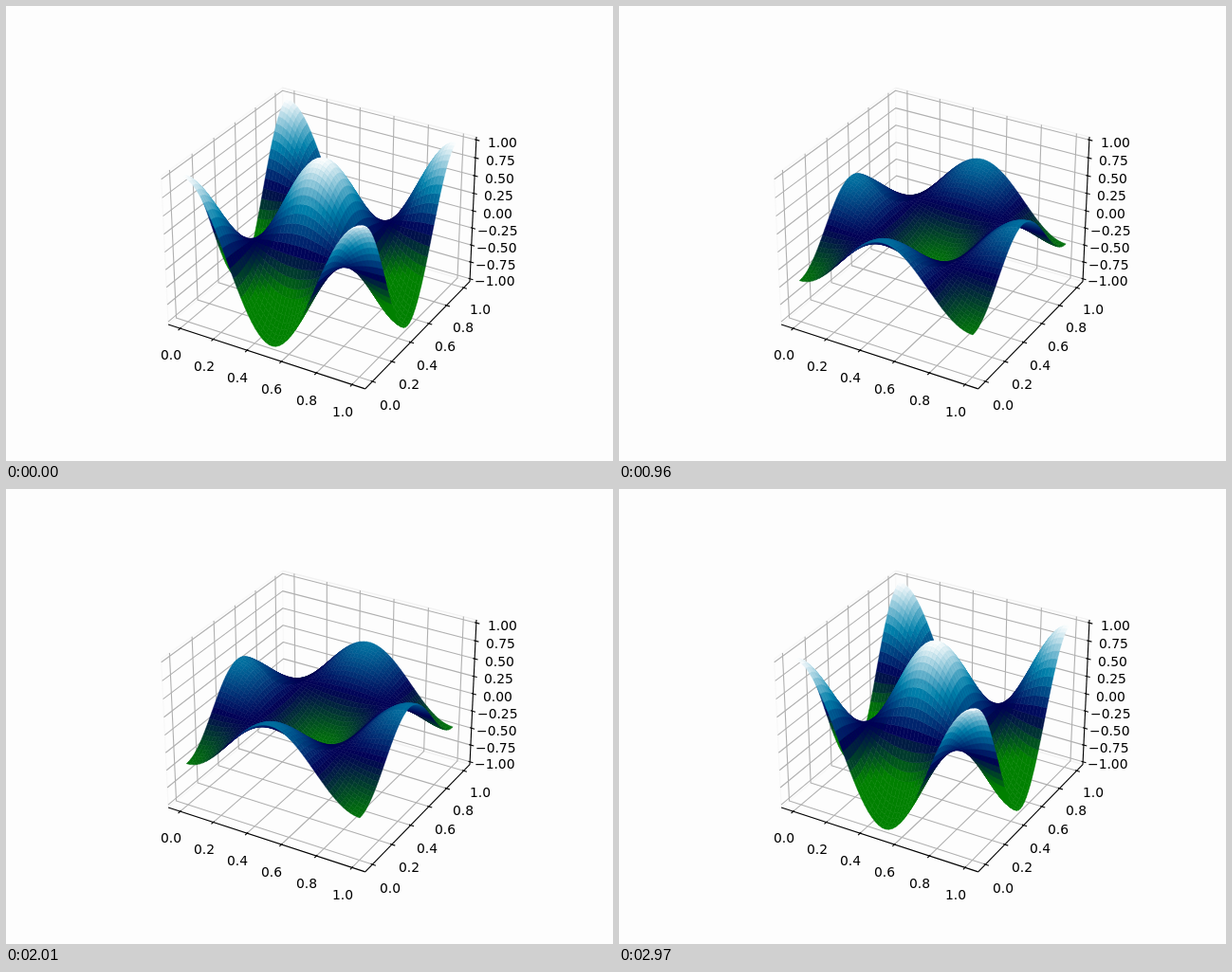
These frames come from a looping animation (640x480 px, 3000 ms). An HTML page with a canvas:

```html
<!DOCTYPE html>
<html>
<head>
<meta charset="utf-8">
<style>
html, body { margin: 0; width: 100%; height: 100%; overflow: hidden; background: #fdfdfd; }
canvas { display: block; }
</style>
</head>
<body>
<canvas id="stage" width="640" height="480"></canvas>
<script>
const ctx = document.getElementById('stage').getContext('2d');

// Box half sizes, pane overhang, and step lengths for ticks and labels
const SIDE = 8 / 7, HEIGHT = 6 / 7;
const H = SIDE * (0.5 + 1 / 48), HZ = HEIGHT * (0.5 + 1 / 48);
const TICK = SIDE / 12, PAD = 1.0372;
const LAB = H + PAD * SIDE / 12, LABZ = HZ + PAD * HEIGHT / 12;
const S3 = Math.sqrt(3);

// Data to box coordinates (x and y carry a 5% margin)
const bx = v => SIDE * (v - 0.5) / 1.1;
const bz = v => HEIGHT * v / 2;

// Perspective view: elevation 30, azimuth -60, distance 10
function project([x, y, z]) {
  const right = S3 / 2 * x + y / 2;
  const up = -x / 4 + S3 / 4 * y + S3 / 2 * z;
  const near = S3 / 4 * x - 0.75 * y + z / 2;
  const k = 369.6 / 0.185 / (10 - near);
  return [143.2 + 369.6 * 0.095 / 0.185 + k * right,
          427.2 - 369.6 * 0.095 / 0.185 - k * up, near];
}

function trace(points) {
  ctx.beginPath();
  for (const p of points) ctx.lineTo(p[0], p[1]);
}

function line(points, color, width = 1.11) {
  trace(points.map(project));
  ctx.strokeStyle = color;
  ctx.lineWidth = width;
  ctx.stroke();
}

// Label centred by its ink, hanging below the anchor
function label(text, point) {
  const [x, y] = project(point), m = ctx.measureText(text);
  const ink = m.actualBoundingBoxLeft + m.actualBoundingBoxRight;
  ctx.fillText(text, Math.round(x - ink / 2), Math.round(y + 11));
}

const xyTicks = [0, 0.2, 0.4, 0.6, 0.8, 1];
const zTicks = [-1, -0.75, -0.5, -0.25, 0, 0.25, 0.5, 0.75, 1];

function drawAxes() {
  line([[-H, -H, -HZ], [-H, H, -HZ], [-H, H, HZ], [-H, -H, HZ], [-H, -H, -HZ]], '#f8f8f8', 1.39);
  line([[-H, H, -HZ], [H, H, -HZ], [H, H, HZ], [-H, H, HZ]], '#f2f2f2', 1.39);
  line([[-H, -H, -HZ], [H, -H, -HZ], [H, H, -HZ]], '#f5f5f5', 1.39);

  const grid = '#b0b0b0';
  for (const t of xyTicks) {
    const p = bx(t);
    line([[p, -H, -HZ], [p, H, -HZ], [p, H, HZ]], grid);
    line([[H, p, -HZ], [-H, p, -HZ], [-H, p, HZ]], grid);
  }
  for (const t of zTicks) {
    const p = bz(t);
    line([[-H, -H, p], [-H, H, p], [H, H, p]], grid);
  }

  line([[-H, -H, -HZ], [H, -H, -HZ]], '#000');
  line([[H, -H, -HZ], [H, H, -HZ]], '#000');
  line([[H, H, -HZ], [H, H, HZ]], '#000');

  ctx.fillStyle = '#000';
  ctx.font = '13.89px "DejaVu Sans", sans-serif';
  const inner = H - 0.1 * TICK, outer = H + 0.2 * TICK;
  for (const t of xyTicks) {
    const p = bx(t), text = t.toFixed(1);
    line([[p, -inner, -HZ], [p, -outer, -HZ]], '#000');
    line([[inner, p, -HZ], [outer, p, -HZ]], '#000');
    label(text, [p, -LAB, -LABZ]);
    label(text, [LAB, p, -LABZ]);
  }
  for (const t of zTicks) {
    const p = bz(t);
    line([[inner, H, p], [outer, H, p]], '#000');
    label(t.toFixed(2).replace('-', '\u2212'), [LAB, LAB, p]);
  }
}

// Green - navy - blue - white ramp over heights -0.5 to 1
function ocean(z) {
  const v = Math.min(1, Math.max(0, (z + 0.5) / 1.5));
  const c = [Math.max(0, 3 * v - 2), Math.abs(3 * v - 1) / 2, v];
  return `rgb(${c.map(n => Math.min(253, Math.round(n * 255)))})`;
}

const N = 50;
const knots = Array.from({ length: N + 1 }, (_, i) => Math.min(2 * i, 99) / 99);

function drawSurface(amp) {
  const wave = v => Math.cos(2 * Math.PI * v);
  const nodes = knots.map(x => knots.map(y => {
    const z = amp * wave(x) * wave(y);
    return { z, p: project([bx(x), bx(y), bz(z)]) };
  }));
  const faces = [];
  for (let i = 0; i < N; i++) {
    for (let j = 0; j < N; j++) {
      const q = [nodes[i][j], nodes[i + 1][j], nodes[i + 1][j + 1], nodes[i][j + 1]];
      faces.push({
        points: q.map(n => n.p),
        z: q.reduce((s, n) => s + n.z, 0) / 4,
        near: q.reduce((s, n) => s + n.p[2], 0)
      });
    }
  }
  faces.sort((a, b) => a.near - b.near);
  ctx.lineWidth = 0.5;
  ctx.lineJoin = 'round';
  for (const f of faces) {
    trace(f.points);
    ctx.closePath();
    ctx.fillStyle = ctx.strokeStyle = ocean(f.z);
    ctx.fill();
    ctx.stroke();
  }
}

let shown = -1;
const start = performance.now();

function draw(now) {
  const step = Math.floor(Math.max(0, now - start) / 30) % 100;
  if (step !== shown) {
    shown = step;
    ctx.fillStyle = '#fdfdfd';
    ctx.fillRect(0, 0, 640, 480);
    drawAxes();
    drawSurface(Math.cos(2 * Math.PI * step / 99));
  }
  requestAnimationFrame(draw);
}
draw(start);
</script>
</body>
</html>
```
